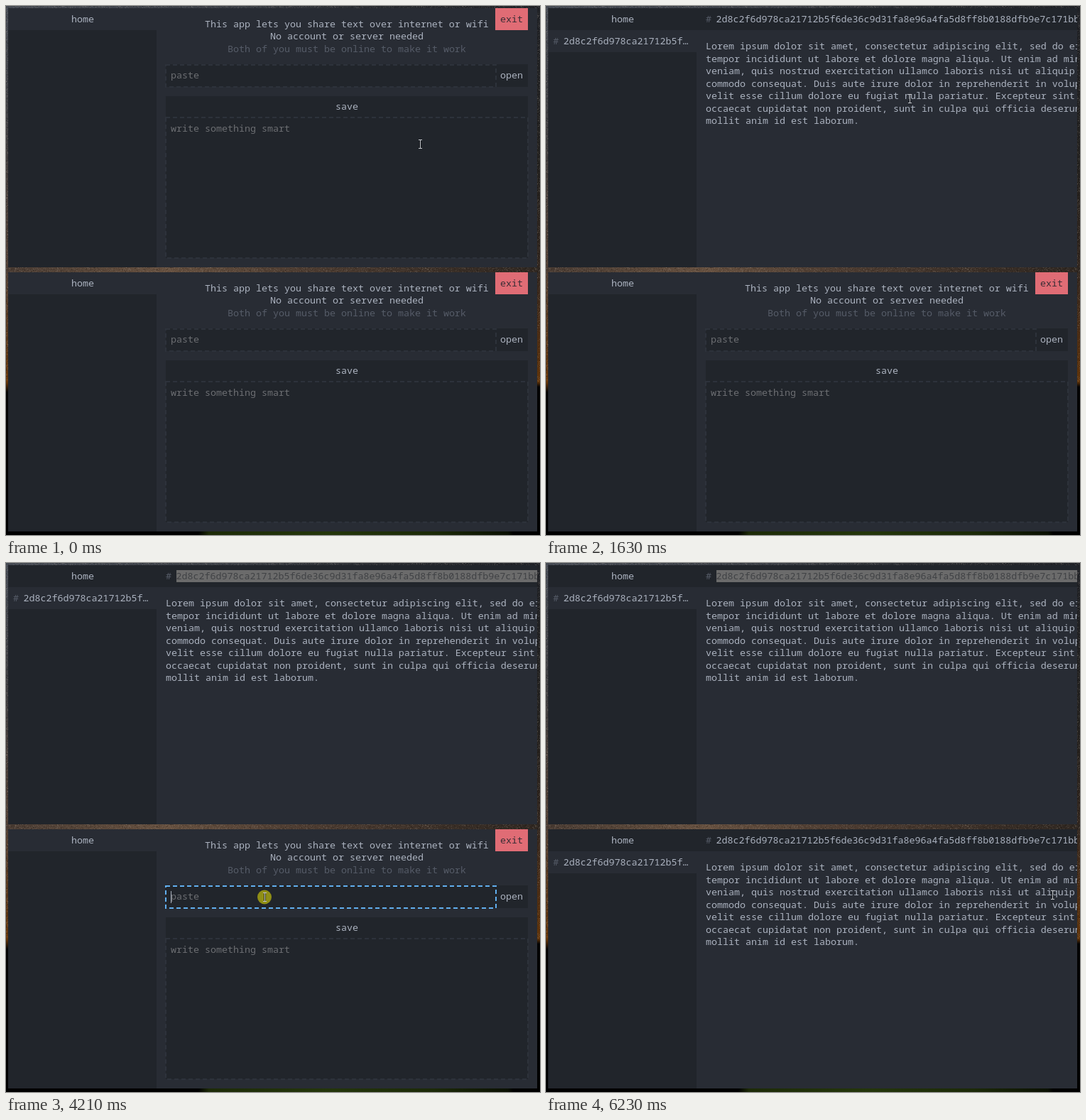
Recreate the animation shown at these times as an HTML page with a canvas. Size 752 by 745 pixels, loop 9.4 s.

```html
<!DOCTYPE html>
<html>
<head>
<meta charset="utf-8">
<style>
html, body { margin: 0; width: 100%; height: 100%; overflow: hidden; background: #000; }
canvas { display: block; }
</style>
</head>
<body>
<canvas id="stage" width="752" height="745"></canvas>
<script>
const W = 752, H = 745, LOOP = 9400, PANE = 372;
const ctx = document.getElementById('stage').getContext('2d');
const FONT = '13.333px "Noto Sans Mono", "DejaVu Sans Mono", monospace';
const C = {
  side: '#21252b', main: '#282c34', text: '#abb2bf', dim: '#565c68', hint: '#6c6e72',
  red: '#e06c75', focus: '#61afef', border: '#2d323b'
};
const HASH = '2d8c2f6d978ca21712b5f6de36c9d31fa8e96a4fa5d8ff8b0188dfb9e7c171bb';
const LOREM = 'Lorem ipsum dolor sit amet, consectetur adipiscing elit, sed do eiusmod tempor ' +
  'incididunt ut labore et dolore magna aliqua. Ut enim ad minim veniam, quis nostrud exercitation ' +
  'ullamco laboris nisi ut aliquip ex ea commodo consequat. Duis aute irure dolor in reprehenderit ' +
  'in voluptate velit esse cillum dolore eu fugiat nulla pariatur. Excepteur sint occaecat cupidatat ' +
  'non proident, sunt in culpa qui officia deserunt mollit anim id est laborum.';
const KNOWN = 'sit do Ut ad ex ea in non id est'.split(' ');

// Event times in ms
const T = {
  focusTop: 210, paste: 420, save: 1520, select: 2700, blurTop: 3710,
  focusLow: 4190, pasteLow: 4390, blurLow: 5940, openLow: 6130
};
const CLICKS = [[110, 300], [1430, 1520], [2500, 2700], [4100, 4280], [5940, 6130]];

// Cursor keys: time, x, y, shape (a = arrow, i = text beam), glide to the next key
const PATH = [
  [0, 583, 194, 'i'], [600, 583, 194, 'i', 1], [860, 540, 156, 'a', 1], [1020, 522, 137, 'a'],
  [1120, 520, 137, 'a'], [1210, 518, 137, 'a'], [1600, 518, 137, 'i', 1], [2010, 445, 46, 'a', 1],
  [2110, 438, 33, 'a'], [2310, 440, 27, 'a'], [2400, 441, 20, 'i'], [2800, 441, 25, 'i'],
  [3310, 392, 356, 'a'], [3420, 392, 372, 'a'], [3710, 240, 405, 'a', 1], [3830, 42, 432, 'a', 1],
  [4060, 364, 470, 'i'], [4660, 430, 452, 'a', 1], [4790, 583, 432, 'a'],
  [4890, 590, 434, 'a', 1], [5450, 711, 466, 'a'], [6230, 713, 467, 'i']
];

function wrap(words, limit) {
  const lines = [''];
  for (const word of words.split(' ')) {
    const last = lines[lines.length - 1];
    if (!last) lines[lines.length - 1] = word;
    else if (last.length + 1 + word.length <= limit) lines[lines.length - 1] += ' ' + word;
    else lines.push(word);
  }
  return lines;
}
const NOTE = wrap(LOREM, 61), PAGE = wrap(LOREM, 72);

function box(x, y, x2, y2, color, g = ctx) {
  g.fillStyle = color;
  g.fillRect(x, y, x2 - x, y2 - y);
}
function text(s, x, y, color = C.text) {
  ctx.fillStyle = color;
  ctx.fillText(s, x, y);
}
const centered = (s, x, y, color) => text(s, x - s.length * 4, y, color);

function clipped(x, y, x2, y2, draw) {
  ctx.save();
  ctx.beginPath();
  ctx.rect(x, y, x2 - x, y2 - y);
  ctx.clip();
  draw();
  ctx.restore();
}
function dashed(x, y, w, h, color) {
  ctx.strokeStyle = color;
  ctx.lineWidth = 2;
  ctx.setLineDash([6, 4]);
  ctx.strokeRect(x, y, w, h);
  ctx.setLineDash([]);
}
function squiggle(x, y, w) {
  ctx.strokeStyle = '#e01818';
  ctx.lineWidth = 1.2;
  ctx.beginPath();
  for (let i = 0; i <= w; i += 2) ctx.lineTo(x + i, y + (i / 2 % 2 ? 0.6 : -0.6));
  ctx.stroke();
}
function misspelled(line, x, y) {
  for (const m of line.matchAll(/\w+/g))
    if (!KNOWN.includes(m[0])) squiggle(x + m.index * 8, y + 3, m[0].length * 8);
}

function makeWallpaper() {
  const cv = document.createElement('canvas');
  cv.width = W;
  cv.height = H;
  const g = cv.getContext('2d');
  let seed = 7;
  const rand = () => (seed = seed * 16807 % 2147483647) / 2147483647;
  const strip = (x, y, x2, y2, vertical, stops) => {
    const grad = vertical ? g.createLinearGradient(0, 0, 0, H) : g.createLinearGradient(0, 0, W, 0);
    stops.forEach(([at, color]) => grad.addColorStop(at, color));
    box(x, y, x2, y2, grad, g);
    for (let n = (x2 - x) * (y2 - y) * 0.6; n > 0; n--) {
      const px = x + Math.floor(rand() * (x2 - x)), py = y + Math.floor(rand() * (y2 - y));
      const shade = rand() < 0.5 ? '0,0,0' : '190,180,170';
      if (py < 530) box(px, py, px + 1, py + 1, `rgba(${shade},${rand() * 0.22})`, g);
    }
  };
  strip(0, 0, 4, H, true, [[0, '#474c55'], [0.25, '#3f3e40'], [0.5, '#513f33'], [0.65, '#5c3716'],
    [0.71, '#6b3808'], [0.73, '#050403'], [1, '#000']]);
  strip(747, 0, W, H, true, [[0, '#202227'], [0.3, '#23211f'], [0.5, '#33271f'], [0.62, '#4c2d14'],
    [0.71, '#633509'], [0.72, '#030303'], [1, '#000']]);
  strip(0, 0, W, 4, false, [[0, '#474c55'], [0.45, '#3a3e45'], [0.7, '#292c31'], [1, '#202227']]);
  strip(0, 367, W, 376, false, [[0, '#4a3c33'], [0.3, '#66503f'], [0.55, '#4e3d32'], [1, '#2e2620']]);
  strip(0, 740, W, H, false, [[0, '#000'], [0.36, '#000'], [0.38, '#1d2b08'], [0.6, '#24360b'],
    [0.8, '#1c2a08'], [0.94, '#0b1103'], [0.95, '#000'], [1, '#000']]);
  return cv;
}
const wallpaper = makeWallpaper();

function homePage(s) {
  box(3, 3, 212, 34, C.main);
  centered('This app lets you share text over internet or wifi', 480, 30);
  centered('No account or server needed', 480, 47);
  centered('Both of you must be online to make it work', 480, 65, C.dim);
  box(689, 3, 735, 34, C.red);
  centered('exit', 712, 23, '#3a2e36');

  box(225, 82, 690, 114, C.side);
  if (!s.hoverOpen) box(690, 82, 735, 114, C.side);
  if (!s.hoverSave) box(225, 127, 735, 156, C.side);
  box(225, 156, 735, 355, C.side);
  dashed(225, 83, 465, 31, s.linkFocus ? C.focus : C.border);
  dashed(225, 157, 510, 198, s.noteFocus ? C.focus : C.border);
  centered('open', 712, 102);
  centered('save', 480, 146);

  if (s.link) clipped(232, 84, 684, 113, () => {
    const x = s.linkFocus ? 683.5 - HASH.length * 8 : 232;
    text(HASH, x, 102);
    if (s.linkFocus) squiggle(232, 105, 452);
  });
  else text('paste', 232, 102, C.hint);

  if (s.note) NOTE.forEach((line, i) => {
    const y = Math.round(177.4 + i * 17.57);
    text(line, 232, y);
    misspelled(line, 232, y);
  });
  else text('write something smart', 232, 177, C.hint);

  if (s.noteFocus && !s.note) box(232, 165, 233, 182, C.text);
  if (s.linkFocus && !s.link) box(232, 90, 233, 107, C.text);
}

function notePage(s) {
  box(3, 3, 748, 34, C.side);
  box(3, 34, 212, 65, C.main);
  text('#', 10, 54, C.dim);
  text(HASH.slice(0, 21) + '…', 24.5, 54);
  text('#', 225, 23, C.dim);
  if (s.mark) box(240, 10, 748, 27, s.mark === 'active' ? '#0f62d3' : '#6b6b6b');
  text(HASH, 239.5, 23, { active: '#fff', idle: '#404245' }[s.mark]);
  PAGE.forEach((line, i) => text(line, 225, Math.round(61 + i * 17.53)));
}

function pane(y, s) {
  ctx.save();
  ctx.translate(0, y);
  clipped(3, 3, 748, 368, () => {
    box(3, 3, 748, 368, C.main);
    box(3, 3, 212, 368, C.side);
    (s.opened ? notePage : homePage)(s);
    centered('home', 108, 23);
  });
  ctx.restore();
}

function cursorAt(t) {
  const i = PATH.findLastIndex(k => k[0] <= t);
  const [t0, x, y, shape, glide] = PATH[i], next = PATH[i + 1];
  const p = glide ? (t - t0) / (next[0] - t0) : 0;
  return p ? { x: x + (next[1] - x) * p, y: y + (next[2] - y) * p, shape } : { x, y, shape };
}

const ARROW = new Path2D('M0 0V13.5L3.2 10.6L5.4 15.6L7.8 14.6L5.6 9.8H9.8Z');
function drawCursor({ x, y, shape }, t) {
  if (CLICKS.some(([from, to]) => t >= from && t < to)) {
    ctx.fillStyle = 'rgba(205,200,10,.65)';
    ctx.beginPath();
    ctx.arc(x, y + 0.5, 10, 0, 7);
    ctx.fill();
  }
  ctx.save();
  ctx.translate(Math.round(x), Math.round(y));
  if (shape === 'a') {
    ctx.lineWidth = 2;
    ctx.lineJoin = 'round';
    ctx.strokeStyle = '#15171b';
    ctx.stroke(ARROW);
    ctx.fillStyle = '#fff';
    ctx.fill(ARROW);
  } else {
    box(-1, -6, 2, 7, 'rgba(15,17,20,.6)');
    box(0, -6, 1, 7, '#c4c7cc');
    box(-2, -6, 3, -5, '#c4c7cc');
    box(-2, 6, 3, 7, '#c4c7cc');
  }
  ctx.restore();
}

function draw(t) {
  const cursor = cursorAt(t);
  const { x, y } = cursor;
  ctx.drawImage(wallpaper, 0, 0);
  ctx.font = FONT;
  pane(0, {
    opened: t >= T.save, note: t >= T.paste, noteFocus: t >= T.focusTop,
    hoverSave: t < T.save && y < 156,
    mark: t < T.select ? '' : t < T.blurTop ? 'active' : 'idle'
  });
  pane(PANE, {
    opened: t >= T.openLow, link: t >= T.pasteLow,
    linkFocus: t >= T.focusLow && t < T.blurLow,
    hoverOpen: x > 690 && y > 454 && y < 486
  });
  drawCursor(cursor, t);
}

function frame() {
  draw(performance.now() % LOOP);
  requestAnimationFrame(frame);
}
frame();
</script>
</body>
</html>
```
